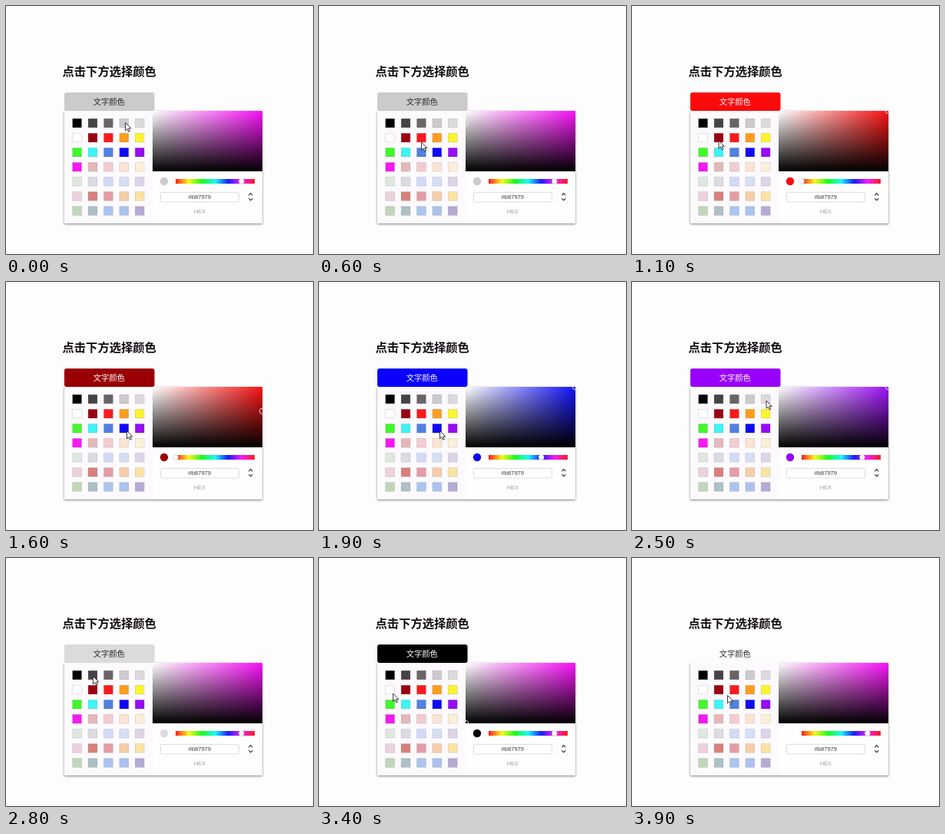
These frames come from a looping animation (400x324 px, 4000 ms). An HTML page:

```html
<!DOCTYPE html>
<html lang="zh-CN">
<head>
<meta charset="utf-8">
<title>Color picker</title>
<style>
  html, body { margin: 0; width: 100%; height: 100%; overflow: hidden; background: #fdfdfd; }
  svg { display: block; width: 400px; height: 324px; }
  text { font-family: "Noto Sans CJK SC", "Noto Sans CJK", sans-serif; }
  .latin { font-family: "Liberation Sans", Arial, sans-serif; text-anchor: middle; }
  .panel { filter: drop-shadow(0 1px 1.5px rgba(0, 0, 0, .5)); }
</style>
</head>
<body>
<svg viewBox="0 0 400 324">
  <defs>
    <linearGradient id="toWhite"><stop stop-color="#fff"/><stop offset="1" stop-color="#fff" stop-opacity="0"/></linearGradient>
    <linearGradient id="toBlack" x2="0" y2="1"><stop stop-opacity="0"/><stop offset="1"/></linearGradient>
    <linearGradient id="rainbow"></linearGradient>
    <clipPath id="field"><rect x="191" y="137" width="143" height="79"/></clipPath>
  </defs>

  <text x="73.5" y="90.5" font-size="15.3" font-weight="700" fill="#120c12">点击下方选择颜色</text>

  <rect class="panel" x="76" y="137" width="258" height="147" rx="1" fill="#fefefe"/>
  <rect x="76.5" y="137" width="114.5" height="146.5" fill="#fcfafd"/>
  <rect id="button" x="76" y="113" width="117.5" height="24" rx="3"/>
  <text id="label" x="134.3" y="128.7" font-size="10.3" text-anchor="middle">文字颜色</text>
  <g id="swatches" stroke="#000" stroke-opacity=".13" stroke-width=".8"></g>

  <g clip-path="url(#field)">
    <rect id="hue" x="191" y="137" width="143" height="79"/>
    <rect x="191" y="137" width="143" height="79" fill="url(#toWhite)"/>
    <rect x="191" y="137" width="143" height="79" fill="url(#toBlack)"/>
    <circle id="picker" r="3.7" fill="none" stroke="#e4dfe4" stroke-width="1"/>
  </g>

  <circle id="preview" cx="206" cy="229" r="5.2"/>
  <rect x="221" y="226" width="103" height="6.2" fill="url(#rainbow)"/>
  <circle id="slider" cy="229" r="3.6" fill="#fbf8fb" stroke="#000" stroke-opacity=".15" stroke-width=".6"/>

  <rect x="201.5" y="243.5" width="102" height="12.5" rx="1" fill="#fff" stroke="#dcdadc" stroke-width=".9"/>
  <text class="latin" x="252.3" y="252.4" font-size="7.6" fill="#3c383c">#b87979</text>
  <text class="latin" x="252.3" y="270.6" font-size="7.4" fill="#a09ca0">HEX</text>
  <path d="M316.3 247.3l2.5-2.6 2.5 2.6M316.3 251.3l2.5 2.6 2.5-2.6" fill="none" stroke="#333" stroke-width="1.2"/>

  <path id="cursor" d="M0 0V10.2L2.4 8 4.1 11.8 5.8 11 4.1 7.4H7.3Z" fill="#fff" stroke="#28222c" stroke-width=".9" stroke-linejoin="round"/>
</svg>

<script>
const $ = id => document.getElementById(id);
const LOOP = 4000, STEP = 100;

const palette = [
  '#000 #464346 #686468 #cccacc #dcdadc',
  '#fff #9a0412 #f91b1b #fc9d20 #fcf430',
  '#42f82c #3ef4f8 #5080e0 #1008f4 #960cf4',
  '#f41af0 #e4b8b8 #f3ccd2 #fbe4d4 #fdf0d8',
  '#dfe8df #dadce2 #d3daf8 #d5e0f5 #dcd5ea',
  '#ebd2dc #d8807c #e49ca6 #f6cea8 #fbe3a4',
  '#c1d7b9 #acc0c5 #acc4f0 #acc2ee #b5aad4'
];
$('swatches').innerHTML = palette.map((row, r) => row.split(' ').map((fill, c) =>
  `<rect x="${86.7 + c * 20.4}" y="${147.2 + r * 19.1}" width="11.8" height="11.6" fill="${fill}"/>`
).join('')).join('');

$('rainbow').innerHTML = [0, 1, 2, 3, 4, 5, 6].map(i =>
  `<stop offset="${i / 6}" stop-color="hsl(${i * 60} 95% 54%)"/>`).join('');

// start time, colour, hue, saturation, value, label colour
const DARK = '#2c282c', LIGHT = '#fff';
const picks = [
  [0, '#cccacc', 300, 0, .8, DARK],
  [700, '#fb0a0a', 0, 1, 1, LIGHT],
  [1200, '#990004', 0, 1, .6, LIGHT],
  [1700, '#0a00fc', 240, 1, 1, LIGHT],
  [2300, '#9800fc', 276, 1, 1, LIGHT],
  [2600, '#dcdadc', 300, 0, .87, DARK],
  [3000, '#000', 300, 0, 0, LIGHT],
  [3500, '#fdfdfd', 300, 0, 1, DARK]
];

// time, x, y of the pointer tip
const path = [
  [0, 155.5, 152.5], [200, 155.5, 152.5], [600, 133.5, 178], [800, 133.5, 178],
  [1100, 113, 176], [1300, 113, 176], [1600, 157.5, 194.5], [1900, 157.5, 194.5],
  [2200, 177.5, 189.5], [2400, 177.5, 189.5], [2500, 175, 155], [2600, 175, 155],
  [2800, 113.5, 154.5], [3000, 94, 155], [3200, 94, 155], [3400, 96.5, 177],
  [3600, 96.5, 177], [3900, 124.5, 179.5], [4000, 155.5, 152.5]
];

function pointerAt(t) {
  const i = path.findIndex(p => p[0] > t);
  const [t0, x0, y0] = path[i - 1], [t1, x1, y1] = path[i];
  const u = (t - t0) / (t1 - t0), k = u * u * (3 - 2 * u);
  return [x0 + (x1 - x0) * k, y0 + (y1 - y0) * k];
}

function set(id, attrs) {
  for (const name in attrs) $(id).setAttribute(name, attrs[name]);
}

function draw(t) {
  const [, fill, hue, sat, val, ink] = picks.filter(p => p[0] <= t).pop();
  set('button', { fill });
  set('preview', { fill });
  set('label', { fill: ink });
  set('hue', { fill: `hsl(${hue} 94% 52%)` });
  set('picker', { cx: 191 + 143 * sat, cy: 137 + 79 * (1 - val) });
  set('slider', { cx: 221 + 103 * hue / 360 });
  set('cursor', { transform: `translate(${pointerAt(t)})` });
}

const start = performance.now();
function tick(now) {
  const t = Math.max(0, now - start) % LOOP;
  draw(Math.floor(t / STEP) * STEP);
  requestAnimationFrame(tick);
}
draw(0);
requestAnimationFrame(tick);
</script>
</body>
</html>
```
